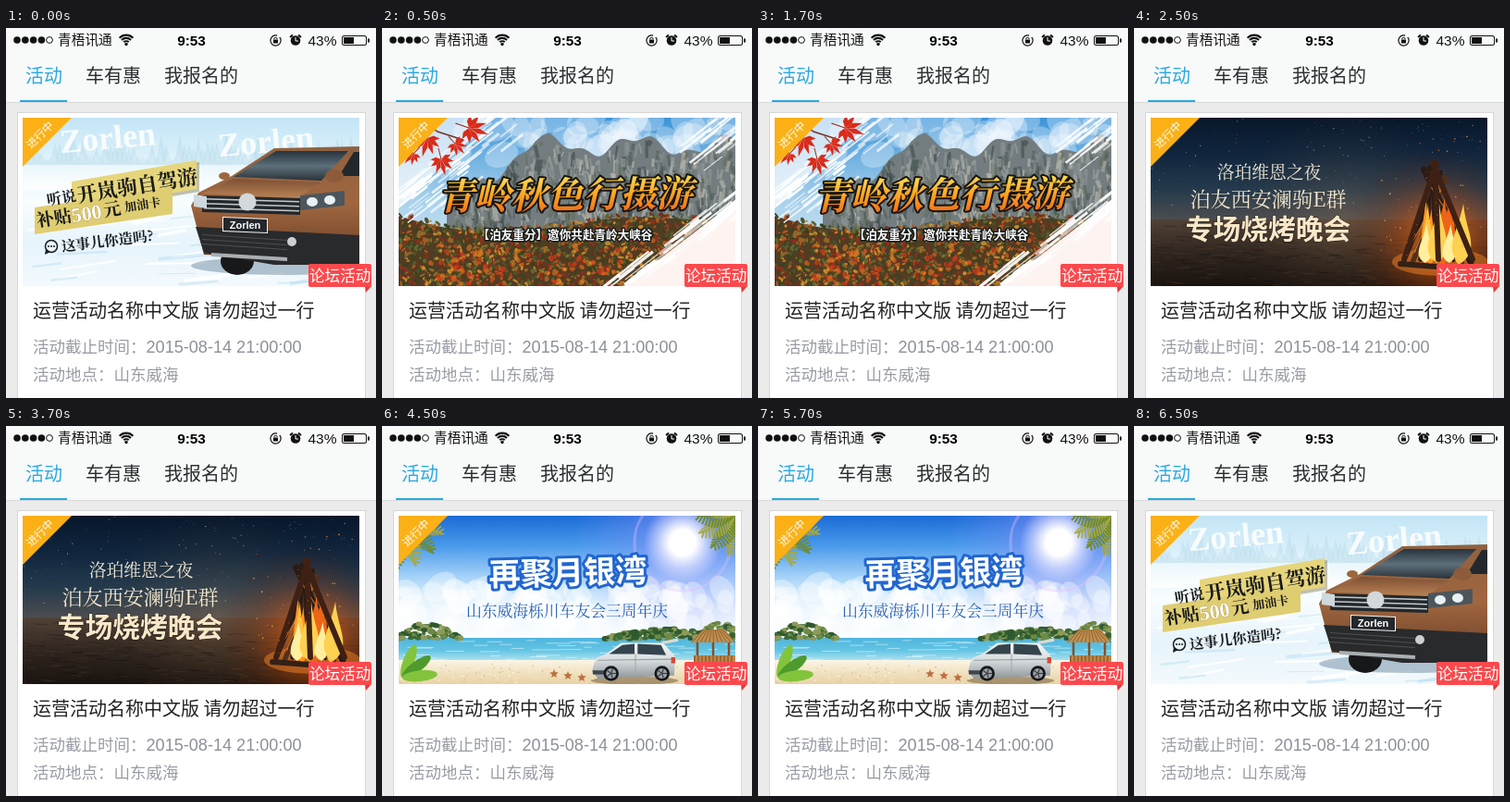
These frames come from a looping animation (400x400 px, 8000 ms). An HTML page with a canvas:

```html
<!DOCTYPE html>
<html lang="zh-CN">
<head>
<meta charset="utf-8">
<title>活动</title>
<style>
html, body { margin: 0; width: 100%; height: 100%; overflow: hidden; background: #ecebeb; }
canvas { display: block; width: 400px; height: 400px; }
</style>
</head>
<body>
<canvas id="stage" width="400" height="400"></canvas>
<script>
const ctx = document.getElementById('stage').getContext('2d');
const SANS = '"Noto Sans CJK SC", "Noto Sans CJK", sans-serif';
const LATIN = '"Liberation Sans", Arial, sans-serif';
const ROMAN = '"Liberation Serif", Times, serif';
const SERIF = '"Noto Serif CJK SC", "Noto Sans CJK SC", serif';
const L = 18, T = 97, R = 382, B = 279; // banner edges
let seed = 1;

function rnd(a = 0, b = 1) {
  seed = (seed * 16807) % 2147483647;
  return a + (b - a) * seed / 2147483647;
}
const pick = list => list[Math.floor(rnd(0, list.length))];

function repeat(n, draw) {
  for (let i = 0; i < n; i++) draw(i);
}

function stops(g, colors) {
  colors.forEach((c, i) => g.addColorStop(i / (colors.length - 1), c));
  return g;
}
const fade = (y0, y1, ...colors) => stops(ctx.createLinearGradient(0, y0, 0, y1), colors);

function rect(fill, x, y, w, h) {
  ctx.fillStyle = fill;
  ctx.fillRect(x, y, w, h);
}

// a full-width strip of the banner
function strip(y0, y1, ...colors) {
  rect(fade(y0, y1, ...colors), L, y0, R - L, y1 - y0);
}

function glow(x, y, r, ...colors) {
  rect(stops(ctx.createRadialGradient(x, y, 0, x, y, r), colors), x - r, y - r, r * 2, r * 2);
}

function path(pts) {
  ctx.beginPath();
  for (let i = 0; i < pts.length; i += 2) ctx.lineTo(pts[i], pts[i + 1]);
}

function poly(fill, ...pts) {
  path(pts);
  ctx.fillStyle = fill;
  ctx.fill();
}

// a box whose right side is shifted by dy
function lean(fill, x, y, w, h, dy) {
  poly(fill, x, y, x + w, y + dy, x + w, y + h + dy, x, y + h);
}

function line(color, width, ...pts) {
  path(pts);
  ctx.strokeStyle = color;
  ctx.lineWidth = width;
  ctx.stroke();
}

function oval(fill, x, y, rx, ry = rx, turn = 0) {
  ctx.beginPath();
  ctx.ellipse(x, y, rx, ry, turn, 0, 7);
  ctx.fillStyle = fill;
  ctx.fill();
}

function ring(color, width, x, y, r, from = 0, to = Math.PI * 2) {
  ctx.beginPath();
  ctx.arc(x, y, r, from, to);
  ctx.strokeStyle = color;
  ctx.lineWidth = width;
  ctx.stroke();
}

function round(fill, x, y, w, h, r) {
  ctx.beginPath();
  ctx.roundRect(x, y, w, h, r);
  ctx.fillStyle = fill;
  ctx.fill();
}

function at(x, y, turn, draw, scale = 1) {
  ctx.save();
  ctx.translate(x, y);
  ctx.rotate(turn);
  ctx.scale(scale, scale);
  draw();
  ctx.restore();
}

// y is the middle of the glyphs
function text(s, x, y, size, fill, { weight = 400, font = SANS, align = 'left', edge, edgeW = 3, style = '' } = {}) {
  ctx.font = `${style} ${weight} ${size}px ${font}`;
  ctx.textAlign = align;
  const base = y + size * 0.37;
  if (edge) {
    ctx.strokeStyle = edge;
    ctx.lineWidth = edgeW;
    ctx.lineJoin = 'round';
    ctx.strokeText(s, x, base);
  }
  ctx.fillStyle = fill;
  ctx.fillText(s, x, base);
}

function dabs(n, x0, y0, x1, y1, size, colors) {
  repeat(n, () => {
    const r = rnd(size * 0.4, size);
    oval(pick(colors), rnd(x0, x1), rnd(y0, y1), r, r * 0.7, rnd(0, 3));
  });
}

function suv() {
  const dark = '#23282c';
  oval('rgba(80,110,135,.4)', 300, 257, 100, 10);
  oval('#17181a', 250, 252, 18, 15);
  poly(fade(130, 250, '#8f6140', '#a0663f', '#6b4128'), 200, 192, 208, 178, 244, 160, 290, 130, R, 128, R, 250, 214, 245);
  poly(fade(133, 166, '#27333c', '#5d6f7a', '#262e34'), 246, 161, 292, 133, 370, 133, 341, 165);
  poly(dark, 360, 160, 376, 134, R, 134, R, 160);
  poly(fade(163, 184, '#7d4f33', '#b98356'), 212, 179, 246, 163, 340, 167, 316, 184);
  oval('#9c673f', 236, 160, 6, 4);
  oval('#8d5b39', 355, 160, 10, 7);
  lean(dark, 212, 181, 106, 18, 3);
  repeat(3, i => lean('#c5cacc', 214, 184 + i * 5, 103, 1.5, 3));
  lean('#cfd8dc', 203, 180, 14, 13, 2);
  lean('#4c565c', 318, 181, 48, 16, -5);
  repeat(2, i => oval('#e8f1f5', 331 + i * 19, 188 - i * 2, 6, 5));
  oval('#d3d8db', 261, 188, 9.5);
  poly('#292a2c', 205, 215, R, 224, R, 256, 290, 256, 214, 243);
  repeat(3, i => lean('#4b5054', 212, 223 + i * 5, 92, 1, 6));
  oval('#cbd1d3', 309, 231, 5);
  lean('#a9afb2', 222, 243, 82, 4, 5);
  lean('#f5f6f6', 234, 204, 49, 16, 2);
  lean(dark, 235, 205, 47, 14, 2);
  text('Zorlen', 258.5, 213, 11, '#fff', { weight: 700, font: LATIN, align: 'center' });
}

function snow() {
  strip(T, B, '#c3e5f6', '#def2fa', '#f8fdff', '#e6f4fb', '#f3fafd');
  seed = 23;
  for (let x = L; x < R; x += 5) poly('rgba(165,208,230,.3)', x - 6, 148, x, 148 - rnd(6, 36), x + 6, 148);
  strip(135, 175, 'rgba(255,255,255,0)', 'rgba(255,255,255,.8)');
  repeat(40, () => {
    const x = rnd(L, R), y = rnd(205, B);
    line(pick(['rgba(150,205,235,.3)', 'rgba(255,255,255,.9)']), rnd(1, 4), x, y, x + rnd(20, 65), y - rnd(0, 9));
  });
  repeat(2, i => at(58 + i * 171, 122 + i * 4, -0.09, () => {
    text('Zorlen', 0, 0, 36, 'rgba(255,255,255,.85)', { weight: 700, font: ROMAN });
  }));
  suv();

  const ink = '#191b1c', bold = { weight: 700, font: SERIF };
  lean('rgba(111,104,61,.4)', 74, 168, 135, 32, -23);
  lean('#e6d57b', 71, 166, 135, 31, -23);
  lean('#dfcd72', 31, 194, 149, 29, -22);
  at(44, 186, -0.16, () => {
    text('听说', 0, 0, 16, ink, bold);
    text('开岚驹自驾游', 33, 0, 22, ink, bold);
  });
  at(33, 208, -0.15, () => {
    text('补贴', 0, 0, 19, ink, bold);
    text('500', 38, 0, 22, '#fff', { weight: 700, font: ROMAN, edge: '#b39b45', edgeW: 1 });
    text('元', 73, 0, 19, ink, bold);
    text('加油卡', 96, 0, 13.2, ink, bold);
  });
  ring(ink, 1.5, 49, 236, 6.5);
  poly(ink, 43, 239, 42, 245, 48, 242);
  repeat(3, i => oval(ink, 46 + i * 3, 236, 1));
  at(60, 236, -0.12, () => text('这事儿你造吗?', 0, 0, 15.5, ink, bold));
}

function maple(x, y, r, turn) {
  at(x, y, turn, () => {
    for (let i = -3; i <= 3; i++) {
      const len = r * (1 - Math.abs(i) * 0.12);
      at(0, 0, i * 0.6, () => poly('#d92b1a', 0, 0, -r * 0.13, -len * 0.5, 0, -len, r * 0.13, -len * 0.5));
    }
    line('#98251a', 1, 0, 0, 0, r * 0.7);
  });
}

// dry white brush marks scattered along a rising diagonal
function brush(n, x0, y0, x1, y1, spread) {
  repeat(n, () => {
    const k = rnd(), off = rnd(-spread, spread), len = rnd(12, 38);
    const x = x0 + (x1 - x0) * k + off, y = y0 + (y1 - y0) * k + off;
    line(`rgba(255,255,255,${rnd(0.5, 1)})`, rnd(0.7, 3.5), x, y, x + len, y - len * 0.78);
  });
}

const ridge = x => 127 + 9 * Math.sin(x / 16) + 4 * Math.sin(x / 6) + Math.max(0, 165 - x) * 0.6;
const treeline = x => 222 + 10 * Math.sin(x / 52) - Math.abs(x - 200) * 0.12;

function autumn() {
  strip(T, B, '#3d94d8', '#a9d2ec', '#eaf2f5');
  seed = 91;
  dabs(50, 80, T, R, 140, 24, ['rgba(247,251,253,.3)']);
  for (let x = 70; x < R; x++) rect('#737d80', x, ridge(x), 1.5, 160);
  repeat(620, () => {
    const x = rnd(78, R), y = rnd(ridge(x) + 2, 222);
    const tone = pick(['#3d4a4a', '#4f5b58', '#8d9494', '#c0bdb0', '#a0a4a0', '#626c57']);
    ctx.globalAlpha = 0.6;
    line(tone, rnd(1, 5), x, y, x + rnd(-4, 4), y + rnd(4, 19));
  });
  ctx.globalAlpha = 1;
  const leaves = ['#8f2f1c', '#b9541f', '#c98a2b', '#4a5229', '#37421f', '#6d3320', '#8c6a2a', '#5d6631'];
  for (let x = L; x < R; x++) rect('#4e3d22', x, treeline(x), 1.5, 80);
  repeat(1700, () => {
    const x = rnd(L, R);
    oval(pick(leaves), x, rnd(treeline(x) - 4, B), rnd(1, 3.6), rnd(0.8, 2.2), rnd(0, 3));
  });
  dabs(120, 60, 235, 260, B, 4, ['rgba(208,59,26,.7)', 'rgba(221,121,32,.6)']);

  poly('rgba(255,255,255,.72)', L, T, 118, T, L, 195);
  brush(60, L, 205, 125, 112, 18);
  brush(26, 330, 145, 375, 105, 14);
  poly('#fdf3f0', 262, B, R, 187, R, B);
  brush(55, 245, B + 8, R, 193, 9);

  line('#783426', 1.5, 40, T, 60, 112, 88, 121);
  repeat(5, i => maple(94 - i * 15, 108 + (i * 17) % 40, 22 - (i * 7) % 10, 1.9 + i * 0.5));
  at(198, 180, -0.015, () => text('青岭秋色行摄游', 0, 0, 39.3, fade(-18, 19, '#ffd84f', '#ffa31f', '#f0701c'),
    { weight: 700, font: SERIF, align: 'center', edge: '#181512', edgeW: 4, style: 'italic' }));
  text('【泊友重分】邀你共赴青岭大峡谷', 198, 223, 12.6, '#fff', { weight: 700, align: 'center', edge: '#171b1a', edgeW: 2.8 });
}

function flame(x, y, w, h, fill) {
  ctx.beginPath();
  ctx.moveTo(x, y);
  ctx.bezierCurveTo(x - w, y - h * 0.2, x - w * 0.2, y - h * 0.5, x + w * 0.1, y - h);
  ctx.bezierCurveTo(x + w * 0.2, y - h * 0.55, x + w, y - h * 0.25, x, y);
  ctx.fillStyle = fill;
  ctx.fill();
}

function night() {
  strip(T, 213, '#08172b', '#10253d', '#243a4c', '#535050');
  strip(207, B, '#514137', '#30261f', '#19130f');
  glow(230, 208, 120, 'rgba(156,118,80,.28)', 'rgba(90,70,55,0)');
  seed = 45;
  dabs(150, L, T, R, 198, 0.8, ['rgba(200,220,235,.25)', 'rgba(200,220,235,.6)']);
  repeat(260, () => {
    const x = rnd(L, R), y = rnd(212, B);
    line(pick(['rgba(113,82,55,.22)', 'rgba(13,10,8,.28)']), 1, x, y, x + rnd(5, 18), y + rnd(-2, 2));
  });
  glow(330, 229, 105, 'rgba(255,150,27,.85)', 'rgba(220,86,11,.48)', 'rgba(153,53,7,.18)', 'rgba(80,24,5,0)');
  oval('rgba(224,123,38,.55)', 331, 253, 52, 15);
  ctx.lineCap = 'round';
  repeat(9, i => {
    const x = 292 + i * 9, top = 334 - i * 2;
    line(i % 2 ? '#51301b' : '#2a1b14', rnd(4, 7), x, 250 + rnd(-7, 5), top + rnd(-5, 5), rnd(145, 163));
    line('rgba(226,132,56,.75)', 1.2, x + 2, 243, top + 2, 170);
  });
  repeat(20, () => flame(rnd(303, 361), rnd(239, 257), rnd(8, 15), rnd(25, 65), pick(['#ef6518', '#ff9624', '#ffc246'])));
  repeat(4, i => flame(315 + i * 13, 254, 15 + i % 2 * 6, 42 + i % 2 * 22, i % 2 ? '#ffd151' : '#fff0a0'));
  repeat(3, i => line('#3e2114', 6, 292 + i * 37, 250, 327 - i * 2, 146));
  line('#332016', 6, 288, 255, 365, 261);
  ctx.lineCap = 'butt';
  dabs(45, 266, 116, 378, 258, 1, ['#ffae43', '#ff7a24']);

  const cream = fade(145, 232, '#f5eddb', '#f5dfba'), mid = { align: 'center', font: SERIF };
  text('洛珀维恩之夜', 146, 156, 18.8, cream, mid);
  text('泊友西安澜驹E群', 145, 185, 22.1, cream, mid);
  text('专场烧烤晚会', 145, 217, 29.8, '#f8e7c8', { weight: 700, align: 'center', edge: 'rgba(25,22,20,.8)', edgeW: 1 });
}

function frond(x, y, len, turn, color) {
  at(x, y, turn, () => {
    for (let i = 2; i < len; i += 3) {
      const d = i * i / len * 0.22, w = 10 * Math.sin(Math.PI * (i + 3) / (len + 6));
      line(color, 1.8, i + 5, d - w, i, d, i + 5, d + w);
    }
  });
}

function palm(x, y, len, from, to) {
  repeat(5, i => frond(x, y, len, from + (to - from) * i / 4, i % 2 ? '#6f8a2c' : '#a5a843'));
}

// a thicket standing on the shoreline
function grove(x, w, h) {
  repeat(w * 1.6, () => {
    const k = rnd(-1, 1), r = rnd(1.5, 4.5);
    oval(pick(['#3f6b35', '#6d8a45', '#2f5a2f', '#8d9a5a']), x + k * w / 2, 230 - rnd(0, h) * (1 - k * k), r, r * 0.7);
  });
}

// drawn around the middle of the sill
function hatchback() {
  const glass = '#35444c';
  oval('rgba(87,67,39,.45)', 0, 22, 43, 4);
  poly(fade(-16, 20, '#f7f8f8', '#d8dddf', '#8f979b'), -42, 13, -38, 0, -28, -4, -13, -15, 28, -15, 40, -2, 39, 17, -36, 20);
  poly(glass, -25, -4, -12, -13, 0, -14, 0, -4);
  poly(glass, 3, -4, 3, -14, 26, -13, 31, -3);
  line('#a1a8ac', 1, 1, -4, 1, 17);
  line('#959da2', 1, -36, 2, 38, 1);
  line('#d7dadb', 3, 27, -15, 43, -18);
  rect('#d44b38', 36, -1, 4, 6);
  rect('#3d474c', -41, 12, 12, 4);
  for (const x of [-23, 27]) {
    oval('#15171a', x, 15, 7.5);
    oval('#9aa0a6', x, 15, 5);
    repeat(5, i => at(x, 15, i * 1.257, () => line('#3a3d42', 1, 0, 0, 5, 0)));
  }
}

function beach() {
  strip(T, 232, '#1a6ad6', '#4c9cec', '#a9d5f8', '#eff8fd', '#fbfdfe');
  seed = 12;
  glow(325, 126, 120, 'rgba(150,140,255,.75)', 'rgba(140,150,250,.3)', 'rgba(140,160,250,0)');
  repeat(7, i => dabs(14, 20 + i * 48, 172, 84 + i * 48, 216, 20, ['rgba(255,255,255,.35)']));
  glow(325, 126, 42, '#fff', '#fff', 'rgba(255,255,255,.45)', 'rgba(255,255,255,0)');
  ring('rgba(225,190,255,.35)', 3, 325, 126, 52);
  strip(229, 256, '#4fb5dd', '#63c4e4', '#bfe9f0');
  repeat(50, () => {
    const x = rnd(L, R), y = rnd(231, 254);
    line('rgba(240,255,255,.5)', 1, x, y, x + rnd(7, 30), y);
  });
  grove(50, 70, 18);
  grove(305, 130, 11);
  grove(365, 45, 20);
  strip(253, B, '#fbf5e6', '#f1e2c2', '#e9d3a6');
  dabs(200, L, 257, R, B, 1.1, ['#d9bd8a', '#fff6df']);
  palm(L, 105, 46, 0, 1.9);
  palm(R, T, 40, 1.5, 3.4);
  repeat(3, i => at(22, 272, -1.2 + i * 0.55, () => oval(i % 2 ? '#4e9a2c' : '#82c43c', 19, 0, 19, 6)));

  repeat(3, i => line('#815126', 2.5, 341 + i * 17, 232, 341 + i * 17, 262));
  poly('#c09050', 333, 234, 347, 220, 371, 220, R, 234);
  repeat(11, i => line('#8f602f', 1, 348 + i * 2, 220, 335 + i * 4.7, 234));
  rect('#bd8648', 337, 248, 45, 10);
  for (let x = 338; x < R; x += 4) line('#794c24', 1, x, 248, x, 258);
  at(273, 251, 0, hatchback, 1.1);
  repeat(3, i => repeat(5, k => at(186 + i * 15, 268 + i * 2, k * 1.257, () => poly('#bc713f', -2, 0, 0, -5, 2, 0))));

  at(201, 158, -0.025, () => text('再聚月银湾', 0, 0, 34.2, '#fff', { weight: 700, align: 'center', edge: '#2266d0', edgeW: 6 }));
  text('山东威海栎川车友会三周年庆', 200, 200, 16.8, '#2860b4', { align: 'center', font: SERIF });
}

function statusBar() {
  const ink = '#111', pi = Math.PI;
  repeat(4, i => oval(ink, 12 + i * 8.8, 13, 3.8));
  ring(ink, 1, 47, 13, 3.4);
  text('青梧讯通', 56, 13, 14.7, ink);
  repeat(3, i => ring(ink, 2.1, 130, 18, 3.8 + i * 3.3, -pi * 0.75, -pi * 0.25));
  oval(ink, 130, 17.5, 1.7);
  text('9:53', 200.5, 13, 15.3, '#000', { weight: 700, font: LATIN, align: 'center' });
  ring(ink, 1.2, 291.5, 13.5, 5.6, -0.7, 5);
  rect(ink, 289, 12.5, 5, 4);
  ring(ink, 1, 291.5, 12, 1.7, pi, pi * 2);
  oval(ink, 313, 13.5, 5.3);
  for (const side of [-1, 1]) line(ink, 2, 313 + side * 6, 10, 313 + side * 3, 7.5);
  line('#fff', 1, 313, 10, 313, 14, 316, 14);
  text('43%', 326.5, 13, 15.5, ink, { font: LATIN });
  round(ink, 363, 8, 27, 11, 2.5);
  round('#f8f9f9', 364, 9, 25, 9, 1.5);
  rect(ink, 365, 10, 11, 7);
  rect(ink, 391, 11.5, 2, 4);
}

function page() {
  const blue = '#2aa9e2', dark = '#2b2e31', muted = '#999ca5';
  rect('#ecebeb', 0, 0, 400, 400);
  rect('#f8f9f9', 0, 0, 400, 80);
  rect('#d9d9d9', 0, 80, 400, 1);
  statusBar();
  text('活动', 21, 52, 20, blue);
  text('车有惠', 86, 52, 20, dark);
  text('我报名的', 171, 52, 20, dark);
  rect(blue, 15, 78, 51, 2);
  rect('#d8d8d8', 12, 91, 377, 309);
  rect('#fff', 13, 92, 375, 308);
  text('运营活动名称中文版 请勿超过一行', 29, 306, 20, '#222');
  text('活动截止时间：', 29, 345, 17.5, muted);
  text('2015-08-14 21:00:00', 151.5, 344.5, 18.1, '#8d9099', { font: LATIN });
  text('活动地点：山东威海', 29, 375, 17.5, muted);
}

function tags() {
  poly('#fbb116', L, T, L + 53, T, L, T + 53);
  at(36.5, 115.5, -Math.PI / 4, () => text('进行中', 0, 0, 11.8, '#fff', { align: 'center' }));
  poly('#e2393b', 388, 279, 395, 279, 389, 286);
  round('#fc494c', 327, 255, 68, 25, 2);
  text('论坛活动', 328, 267.5, 16.6, '#fff');
}

const HOLD = 2000, LEAD = 1500;
const scenes = [snow, autumn, night, beach];
let shown;

function tick(now) {
  const scene = scenes[Math.floor((now + LEAD) / HOLD) % scenes.length];
  if (scene !== shown) {
    shown = scene;
    page();
    ctx.save();
    ctx.beginPath();
    ctx.rect(L, T, R - L, B - T);
    ctx.clip();
    scene();
    ctx.restore();
    tags();
  }
  requestAnimationFrame(tick);
}
tick(performance.now());
</script>
</body>
</html>
```
